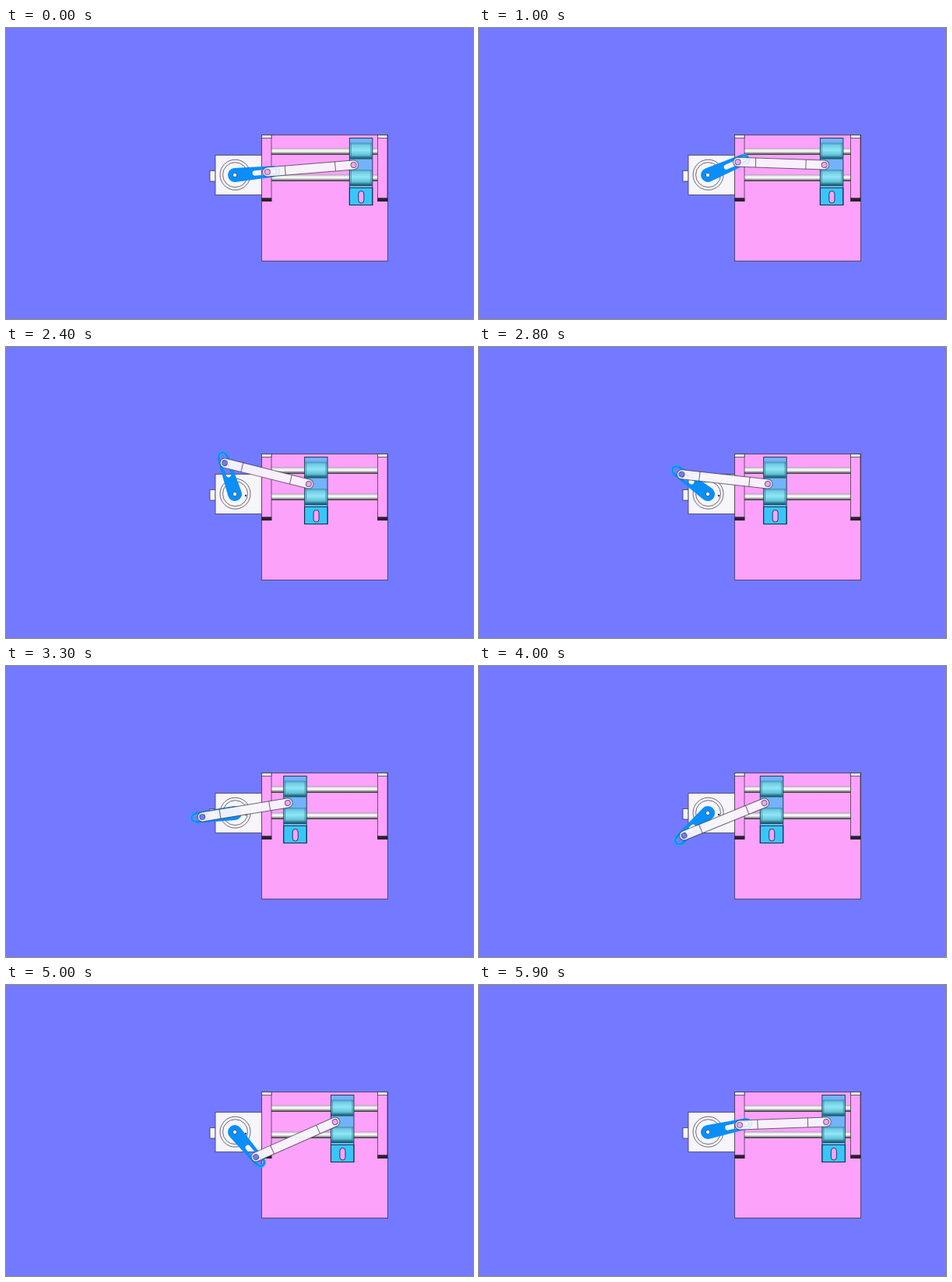
Write an HTML page that moves like this. It is 600 px wide and 374 px high and loops after 6000 ms.

```html
<!DOCTYPE html>
<html lang="en">
<head>
<meta charset="utf-8">
<title>Slider crank</title>
<style>
html, body { margin: 0; width: 100%; height: 100%; overflow: hidden; background: #737aff; }
svg { display: block; width: 600px; height: 374px; }
.line { stroke: #2c2436; stroke-opacity: .68; stroke-width: 1; }
.dark { stroke: #0c2840; stroke-opacity: .85; stroke-width: 1; }
</style>
</head>
<body>
<svg viewBox="0 0 600 374">
  <defs>
    <linearGradient id="steel" x2="0" y2="1">
      <stop offset="0" stop-color="#a89cac"/>
      <stop offset=".2" stop-color="#e4e4e4"/>
      <stop offset=".45" stop-color="#fff"/>
      <stop offset=".65" stop-color="#c0c0c0"/>
      <stop offset="1" stop-color="#282428"/>
    </linearGradient>
    <linearGradient id="bearing" x2="0" y2="1">
      <stop offset="0" stop-color="#4490b4"/>
      <stop offset=".15" stop-color="#70cce4"/>
      <stop offset=".45" stop-color="#90e6f4"/>
      <stop offset=".75" stop-color="#62c2d8"/>
      <stop offset=".88" stop-color="#2c7c90"/>
      <stop offset="1" stop-color="#104858"/>
    </linearGradient>
    <g id="bracket">
      <rect class="line" x=".5" y=".5" width="12.5" height="85" fill="#fca2fb"/>
      <rect class="line" x=".5" y=".5" width="12.5" height="4" fill="#f4eef6"/>
      <rect x=".3" y="81.300" width="13" height="4.700" fill="#2c2030"/>
    </g>
    <g id="sleeve">
      <rect x="1" width="28.500" height="21" fill="url(#bearing)"/>
      <path d="M2.500 1V20M28 1V20" stroke="#2c7894" stroke-opacity=".7"/>
    </g>
  </defs>

  <rect class="line" x="328.500" y="137.500" width="162" height="162" fill="#fca2fb"/>
  <rect x="341" y="154.500" width="137" height="8.500" fill="url(#steel)"/>
  <rect x="341" y="188.500" width="137" height="8.500" fill="url(#steel)"/>
  <use href="#bracket" x="328" y="137"/>
  <use href="#bracket" x="477" y="137"/>

  <g class="line" fill="#f6f5fa">
    <rect x="262" y="183.500" width="7" height="13.500"/>
    <rect x="269" y="163.500" width="59.500" height="51"/>
    <circle cx="294.500" cy="188.700" r="19.500"/>
    <circle cx="294.500" cy="188.700" r="16"/>
  </g>
  <circle cx="308" cy="191" r="1.200" fill="#403c48"/>

  <g id="slider">
    <rect x=".5" y="141.500" width="29.500" height="86" fill="#74b2fc"/>
    <use href="#sleeve" y="147.500"/>
    <use href="#sleeve" y="182"/>
    <rect class="dark" x=".5" y="205.500" width="29.500" height="22" fill="#38c6fa"/>
    <rect class="dark" x="12" y="209.500" width="7" height="15.500" rx="3.500" fill="#fca2fb"/>
    <rect class="dark" x=".5" y="141.500" width="29.500" height="86" fill="none"/>
  </g>

  <g id="crank">
    <path fill="#0a8ef8" fill-rule="evenodd"
      d="M0-9L51-7A7 7 0 0 1 51 7L0 9A9 9 0 0 1 0-9Z
         M26-3.200A3.200 3.200 0 0 0 26 3.200H51A3.200 3.200 0 0 0 51-3.200Z"/>
    <circle r="2.600" fill="#fff" stroke="#24405c" stroke-width=".7"/>
  </g>

  <g id="rod">
    <path class="line" fill="#f8f5fb" fill-opacity=".96" fill-rule="evenodd"
      d="M0-6H111.200A6 6 0 0 1 111.200 6H0A6 6 0 0 1 0-6Z
         M3.500 0A3.500 3.500 0 0 0-3.500 0A3.500 3.500 0 0 0 3.500 0Z"/>
    <path class="line" d="M23-6V6M87.500-6V6"/>
    <circle class="line" cx="111.200" r="3.500" fill="#fca2fb"/>
  </g>

  <!-- faint crank edges seen through the rod -->
  <g id="ghost" fill="none" stroke="#8cc8f0" stroke-opacity=".5" stroke-width=".8">
    <path d="M34-3.200H51A3.200 3.200 0 0 1 51 3.200H34M51-6.500A6.500 6.500 0 0 1 51 6.500"/>
  </g>
</svg>
<script>
const LOOP = 6000, STEP = 100;
const HUB = { x: 294, y: 189 }, RADIUS = 42, ROD = 111.2, PIN_Y = 176;

// [time in ms, crank angle in degrees, counterclockwise]
const KEYS = [[0, 5.4], [200, 18], [900, 18], [1500, 50.7], [2400, 108],
  [3300, 186.8], [4000, 223.6], [5000, 310.2], [5900, 372.4]];

const [slider, crank, rod, ghost] =
  ["slider", "crank", "rod", "ghost"].map(id => document.getElementById(id));

function angleAt(t) {
  const i = Math.max(1, KEYS.findIndex(k => k[0] >= t));
  const [t0, a0] = KEYS[i - 1], [t1, a1] = KEYS[i];
  return a0 + (a1 - a0) * (t - t0) / (t1 - t0);
}

function place(el, x, y, deg = 0) {
  el.setAttribute("transform", `translate(${x} ${y}) rotate(${deg})`);
}

function draw(now) {
  const t = Math.floor(now % LOOP / STEP) * STEP;
  const deg = angleAt(t), a = deg * Math.PI / 180;
  const x = HUB.x + RADIUS * Math.cos(a), y = HUB.y - RADIUS * Math.sin(a);
  const tilt = Math.asin((PIN_Y - y) / ROD);
  place(crank, HUB.x, HUB.y, -deg);
  place(ghost, HUB.x, HUB.y, -deg);
  place(rod, x, y, tilt * 180 / Math.PI);
  place(slider, x + ROD * Math.cos(tilt) - 5.8, 0);
}

const start = performance.now();
function tick() {
  draw(performance.now() - start);
  requestAnimationFrame(tick);
}
tick();
</script>
</body>
</html>
```
